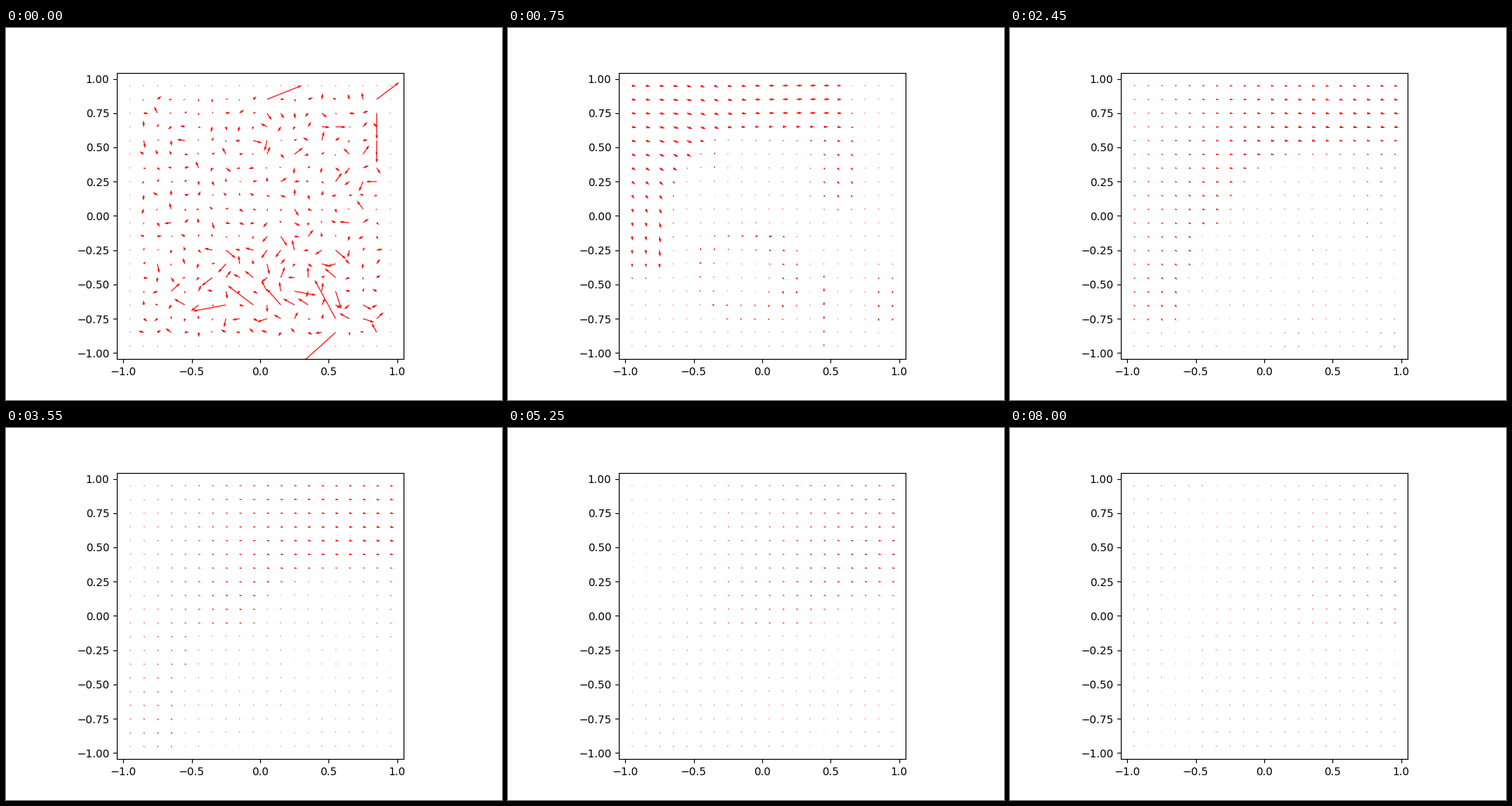
Recreate the animation shown at these times as a matplotlib script. Size 640x480 px, loop 8.05 s.

```python
import numpy as np
import matplotlib.pyplot as plt
from matplotlib.animation import FuncAnimation

N = 20
FRAMES = 161
STEP = 50           # ms
SETTLE = 7          # frames until the turbulence has turned into jets
SUBSTEPS = 2
SPEED = 1.18        # grid cells per second for an arrow of one pixel
VISCOSITY = 0.05    # cells squared per second
INFLOW = 0.87       # share of the edge velocity that enters from outside

rng = np.random.default_rng(11)
col, row = np.meshgrid(np.arange(N), np.arange(N))

# Key jets: centre col, row, half widths, velocity in px (rows and v point down)
JETS = [
    (0, 1.5, 1.9, 4, 9, 1),
    (9, 1, 5, 2.6, 8, -1),
    (3, 1.5, 1.6, 3, 4, 4),
    (2, 7.5, 0.6, 3.8, 0, 10),
    (0.5, 8, 1.3, 5, 0, 5.5),
    (14.5, 5, 1.8, 3.5, 2, 4),
    (14, 17, 0.7, 2.8, 0, -7),
    (5.3, 6, 0.9, 2.5, 1, -5),
    (18.3, 14.5, 1.3, 2.5, -0.5, 4),
]

# The longest arrows of the first picture: col, row, dx, dy
GUSTS = [
    (10, 1, 45, -18), (18, 1, 29, -22), (18, 2, 0, 34), (18, 4, 0, 29),
    (7, 16, -43, 8), (9, 16, -33, -25), (15, 17, -27, -50), (15, 18, -42, 38),
]


def vector(u, v):
    return np.array([u, v], float)[:, None, None]


def turbulence():
    """Random arrows, stronger in the lower middle and still at the border."""
    size = np.clip(rng.lognormal(np.log(5.5), 0.5, (N, N)), 2.5, 14)
    size *= 1 + 1.4 * np.exp(-((col - 11) / 5)**2 - ((row - 14.5) / 2.5)**2)
    size[[0, -1]] = size[:, [0, -1]] = 0
    angle = rng.uniform(0, 2 * np.pi, (N, N))
    field = size * np.array([np.cos(angle), np.sin(angle)])
    for c, r, dx, dy in GUSTS:
        field[:, r, c] = dx, dy
    return field


def swirl(c, r, wc, wr, speed):
    dc, dr = (col - c) / wc, (row - r) / wr
    ring = np.exp(-((np.hypot(dc, dr) - 1) / 0.4)**2)
    return speed * ring * np.array([-dr, dc])


def jets():
    field = vector(0.4, 0.5) + swirl(8.2, 13.6, 2.9, 2.5, 6)
    for c, r, wc, wr, u, v in JETS:
        field += vector(u, v) * np.exp(-((col - c) / wc)**4 - ((row - r) / wr)**4)
    return field


def advance(f, dt):
    """One upwind step of Burgers' equation."""
    p = np.pad(f, ((0, 0), (1, 1), (1, 1)), mode="edge")
    p[:, [0, -1]] *= INFLOW
    p[:, :, [0, -1]] *= INFLOW
    west, east = p[:, 1:-1, :-2], p[:, 1:-1, 2:]
    north, south = p[:, :-2, 1:-1], p[:, 2:, 1:-1]
    u, v = f * SPEED * dt
    across = u * np.where(u > 0, f - west, east - f)
    along = v * np.where(v > 0, f - north, south - f)
    spread = VISCOSITY * dt * (west + east + north + south - 4 * f)
    return f - across - along + spread


def simulate():
    states = [jets()]
    for _ in range(FRAMES - SETTLE):
        f = states[-1]
        for _ in range(SUBSTEPS):
            f = advance(f, STEP / 1000 / SUBSTEPS)
        states.append(f)
    return states


start = turbulence()
flow = simulate()


def velocity(k):
    settled = flow[max(0, k - SETTLE)] * (1 - np.exp(-k / 2))
    u, v = start * np.exp(-k / 1.6) + settled
    return u, -v


fig, ax = plt.subplots(figsize=(6.4, 4.8), dpi=100)
ax.set_aspect("equal")
ax.set_xlim(-1.045, 1.045)
ax.set_ylim(-1.045, 1.045)
arrows = ax.quiver(-0.95 + 0.1 * col, 0.95 - 0.1 * row, *velocity(0),
                   color="red", width=0.003, scale=1, scale_units="dots")


def update(k):
    arrows.set_UVC(*velocity(k))
    return (arrows,)


anim = FuncAnimation(fig, update, frames=FRAMES, interval=STEP, repeat=True)
plt.show()
```
